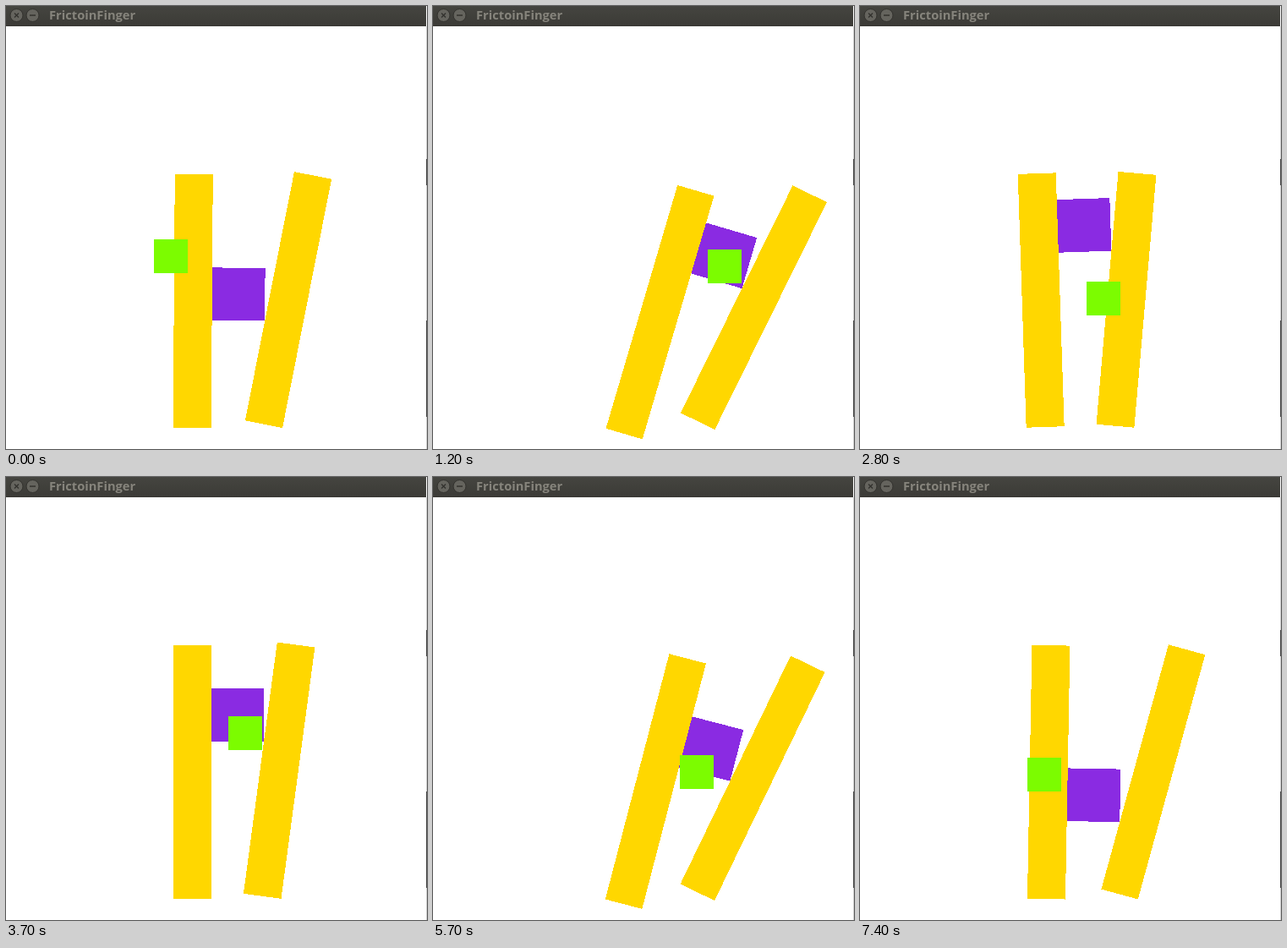
Animation of 498 by 524 pixels, one loop 8 s. Source, as an HTML page:

```html
<!DOCTYPE html>
<html lang="en">
<head>
<meta charset="utf-8">
<title>FrictoinFinger</title>
<style>
html, body { margin: 0; width: 100%; height: 100%; overflow: hidden; background: #fff; }
svg { display: block; }
text { font: bold 14.7px "Open Sans", "Noto Sans", sans-serif; fill: #86847c; }
</style>
</head>
<body>
<svg width="498" height="524" viewBox="0 0 498 524">
  <defs>
    <linearGradient id="bar" x2="0" y2="1">
      <stop offset="0" stop-color="#454540"/>
      <stop offset="1" stop-color="#3b3a36"/>
    </linearGradient>
  </defs>
  <g shape-rendering="crispEdges">
    <path d="M497.5 24V524" stroke="#d0d0d0"/>
    <path d="M497.5 181V212M497.5 372V486" stroke="#444"/>
    <g id="left">
      <rect y="-325" width="45" height="300" fill="#ffd700"/>
      <rect id="block" x="45" width="62.6" height="62.6" fill="#8a2be2"/>
    </g>
    <rect id="right" x="-45" y="-325" width="45" height="300" fill="#ffd700"/>
    <rect id="goal" width="40" height="40" fill="#7cfc00"/>
  </g>
  <rect width="497" height="24" fill="url(#bar)"/>
  <g fill="#65645e" stroke="#33322e">
    <circle cx="12.5" cy="11" r="7.5"/>
    <circle cx="31.5" cy="11" r="7.5"/>
    <path d="M10 8.5l5 5m0-5l-5 5M28 11h7" stroke-width="1.4"/>
  </g>
  <text x="51" y="16">FrictoinFinger</text>
</svg>
<script>
const LOOP = 8000, STEP = 100, SIDE = 62.6, WIDTH = 45;
const L = { x: 197.5, y: 523.7 }, R = { x: 322.2, y: 523.6 };
const SLIDE = 2.24; // px along the left finger per degree, when the right one grips
const HOLD = 0, SLIP = 1;

// Swings of the left finger: start, duration, final angle, what the block does
const swings = [
  [0, 400, -18.1, HOLD], [700, 500, 16.4, SLIP],
  [1500, 300, -13.2, HOLD], [1800, 100, -9.2, HOLD],
  [2300, 200, .3, HOLD], [2500, 100, -2.5, HOLD], [2700, 100, -1.9, SLIP],
  [2800, 400, 5.8, HOLD], [3200, 300, -2.9, SLIP], [3500, 200, 0, HOLD],
  [3700, 200, -1.4, HOLD], [3900, 600, 1.3, HOLD],
  [4700, 100, -4.8, SLIP], [4800, 900, 14.6, HOLD], [5700, 100, 13, SLIP],
  [5900, 400, -15, SLIP], [6300, 200, -8.1, HOLD], [6500, 300, -14.2, SLIP],
  [6800, 200, 1.05, HOLD]
];

// Goal square: time, x, y
const goals = [
  [0, 175, 276], [800, 325, 288], [1600, 210, 262], [2400, 268, 326],
  [3300, 263, 283], [4800, 292, 329], [6000, 198, 332]
];

const el = id => document.getElementById(id);
const left = el("left"), right = el("right"), block = el("block"), goal = el("goal");
const place = (node, p, angle = 0) =>
  node.setAttribute("transform", `translate(${p.x} ${p.y}) rotate(${angle})`);
const easeOut = k => 1 - (1 - k) ** 2;

function poseAt(t) {
  let angle = .4, dist = 152;
  for (const [start, time, end, slip] of swings) {
    if (start > t) break;
    const turn = (end - angle) * easeOut(Math.min(1, (t - start) / time));
    angle += turn;
    dist += slip * SLIDE * turn;
  }
  return [angle, dist];
}

// The right finger's inner edge rests on the block's lower outer corner.
function rightAngle(angle, dist) {
  const a = angle * Math.PI / 180, c = Math.cos(a), s = Math.sin(a);
  const x = L.x + (WIDTH + SIDE) * c + dist * s - R.x;
  const y = L.y + (WIDTH + SIDE) * s - dist * c - R.y;
  return (Math.atan2(y, x) + Math.acos(-WIDTH / Math.hypot(x, y))) * 180 / Math.PI;
}

function draw(now) {
  const t = Math.floor(now % LOOP / STEP) * STEP;
  const [angle, dist] = poseAt(t);
  place(left, L, angle);
  block.setAttribute("y", -dist - SIDE);
  place(right, R, rightAngle(angle, dist));
  const [, x, y] = goals.filter(g => g[0] <= t).pop();
  place(goal, { x, y });
  requestAnimationFrame(draw);
}
draw(performance.now());
</script>
</body>
</html>
```
